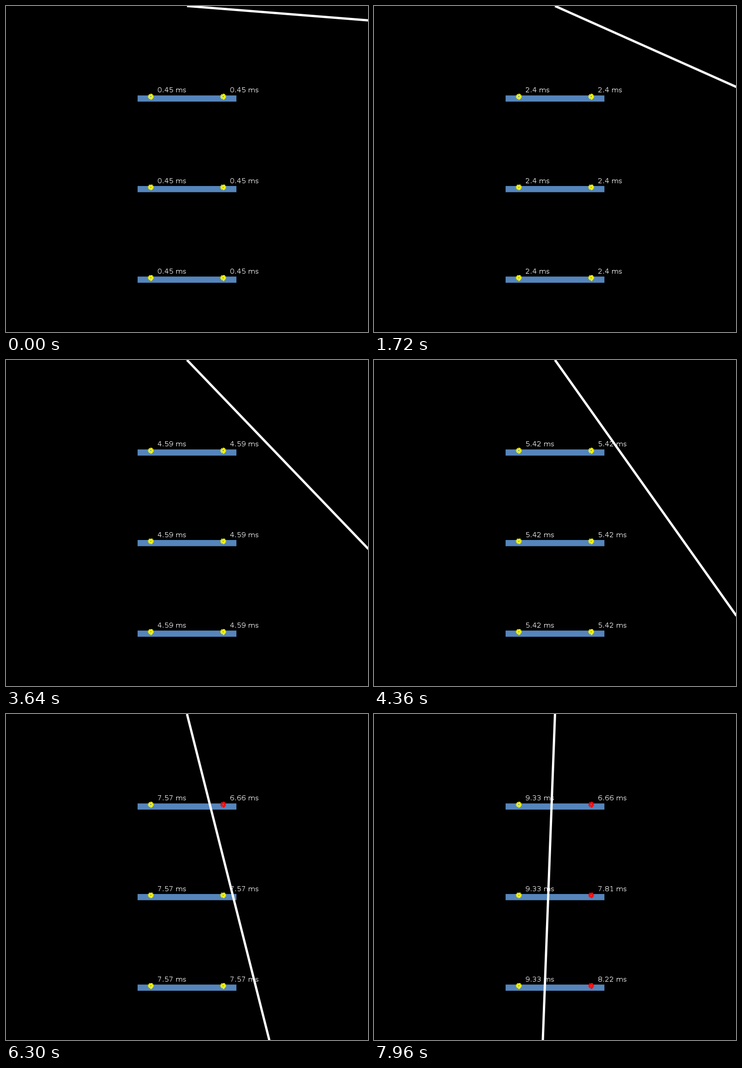
These frames come from a looping animation (789x710 px, 8 s). A matplotlib script:

```python
import math

import matplotlib.pyplot as plt
import numpy as np
from matplotlib.animation import FuncAnimation
from matplotlib.collections import LineCollection
from matplotlib.patches import Rectangle

W, H, DPI = 789, 710, 100
LOOP, STEP = 8000, 20
PX = 72 / DPI

# Key points of the sweep: time in ms, drawing tick, beam angle in degrees
# below horizontal, clock in ms. Ticks slow down once sensors start firing.
TIME, TICK, ANGLE, CLOCK = zip(
    (0, 0, 4.53, 0.45),
    (2880, 72, 37.2, 3.72),
    (5040, 126, 62.65, 6.2),
    (5550, 138, 68.25, 6.78),
    (7050, 170, 83.4, 8.3635),
    (7960, 189, 92.14, 9.33),
)

ROWS = [W * k / 4 for k in (1, 2, 3)]
COLS = [W * 0.4, W * 0.6]
HITS = [6.66, 7.81, 8.22]
YELLOW, RED = "#f8f80a", "#ff0a0a"

plt.rcParams.update({
    "toolbar": "None",
    "font.family": "DejaVu Sans",
    "text.hinting": "default",
    "text.hinting_factor": 1,
})
fig = plt.figure(figsize=(W / DPI, H / DPI), dpi=DPI, facecolor="black")
ax = fig.add_axes([0, 0, 1, 1])
ax.set_xlim(0, W)
ax.set_ylim(H, 0)
ax.axis("off")


def ring(x, y, r=4, n=10):
    """Thick circle of separate strokes, notched where they meet."""
    a = np.linspace(0, 2 * math.pi, n + 1)
    pts = np.column_stack([x + r * np.cos(a), y + r * np.sin(a)])
    segs = list(zip(pts[:-1], pts[1:]))
    return ax.add_collection(
        LineCollection(segs, linewidths=5 * PX, capstyle="butt", zorder=4),
        autolim=False)


beam, = ax.plot([], [], color="white", lw=5 * PX, solid_capstyle="butt", zorder=3)

sensors = []
for row, y in enumerate(ROWS):
    ax.add_patch(Rectangle((W / 2 - 107.7, y - 2.5), 215.4, 13.5, lw=0,
                           facecolor="#5585bb", snap=False, zorder=1))
    for x, hit in zip(COLS, (math.inf, HITS[row])):
        label = ax.text(math.floor(x + 15), y - 9, "", color="white",
                        fontsize=15 * PX, ha="left", va="baseline", zorder=5)
        sensors.append((row, hit, ring(x, y), label))


def draw(i):
    t = i * STEP + STEP / 2
    tick = math.floor(np.interp(t, TIME, TICK) + 1e-6)
    a = math.radians(np.interp(tick, TICK, ANGLE))
    beam.set_data([W / 2, W / 2 + W * math.cos(a)], [0, W * math.sin(a)])
    clock = float(np.interp(tick, TICK, CLOCK))
    for row, hit, dot, label in sensors:
        now = clock + 0.001 * row
        dot.set_color(RED if now >= hit else YELLOW)
        label.set_text(f"{round(min(now, hit), 2)} ms")
    return [beam]


anim = FuncAnimation(fig, draw, frames=LOOP // STEP, interval=STEP,
                     init_func=lambda: draw(0), repeat=True, repeat_delay=0,
                     blit=False)
plt.show()
```
